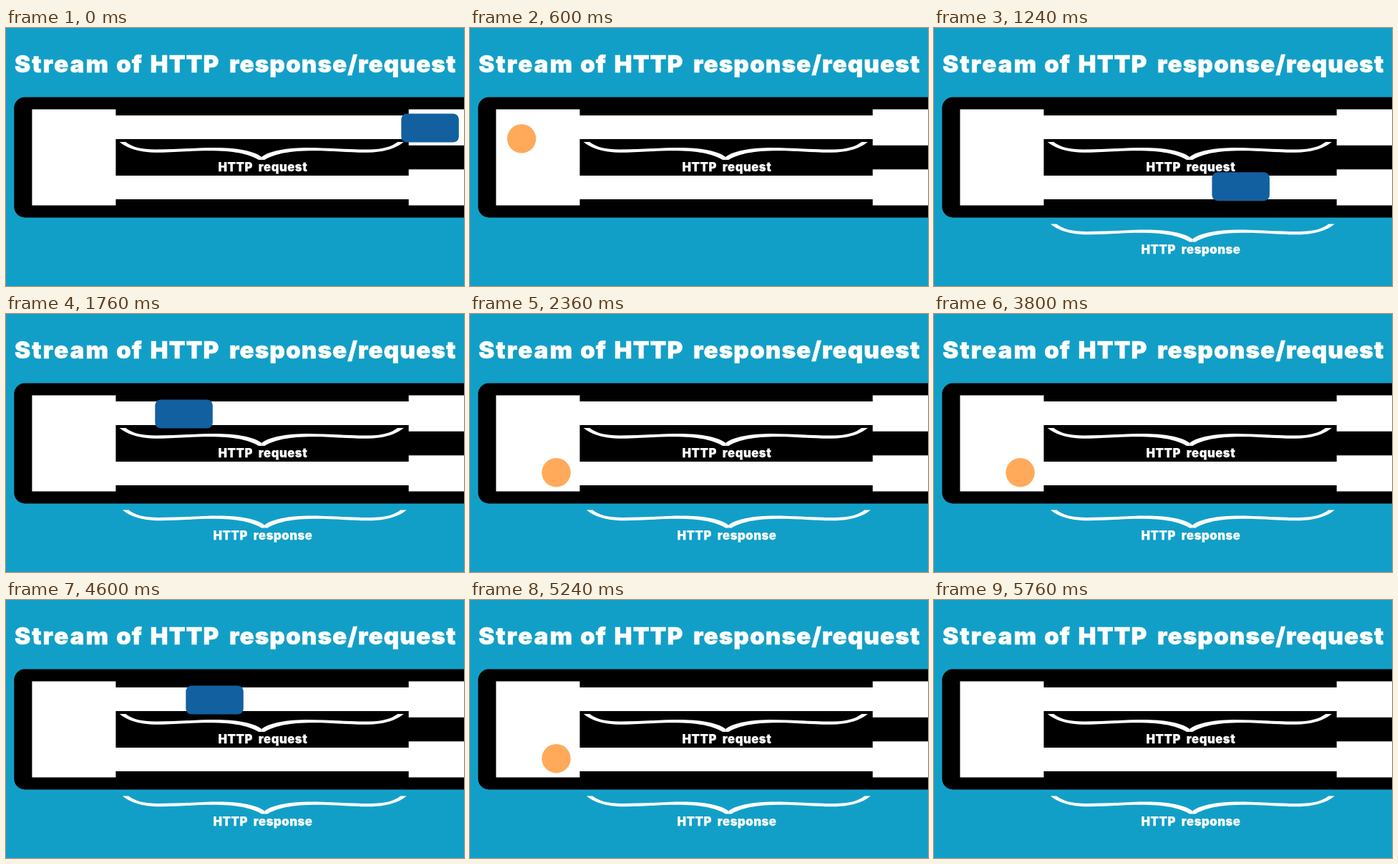
An HTML page for the animation above (7680 ms loop, 640 px wide and 360 px high).

```html
<!DOCTYPE html>
<html lang="en">
<head>
<meta charset="utf-8">
<title>Stream of HTTP response/request</title>
<style>
  html, body { margin: 0; width: 100%; height: 100%; overflow: hidden; background: #129fc7; }
  svg { display: block; width: 640px; height: 360px; }
  text { font-family: Inter, "Open Sans", sans-serif; font-weight: 900; fill: #fff; letter-spacing: .03em; }
  .title { font-size: 33.4px; stroke: #fff; stroke-width: .5px; }
  .label { font-size: 16.7px; stroke: #fff; stroke-width: .25px; }
  .wide { letter-spacing: .06em; }
</style>
</head>
<body>
<svg viewBox="0 0 640 360">
  <defs>
    <path id="half" d="M-198.5 0H-190C-181 7 -168 10.5 -148 10.5C-115 10.5 -90 7.8 -60 8C-30 8.5 -8 14 0 21V25H-4C-14 19 -30 13.5 -60 12.5C-95 11.5 -115 14.8 -145 14.8C-175 14.8 -190 7 -198.5 0Z"/>
    <g id="brace" fill="#fff">
      <use href="#half"/>
      <use href="#half" transform="scale(-1 1)"/>
    </g>
  </defs>

  <text class="title" y="62"><tspan class="wide" x="12">Stream</tspan> <tspan x="154">of</tspan> <tspan x="201.6">HTTP</tspan> <tspan x="312">response/request</tspan></text>

  <rect x="11.3" y="96.6" width="660" height="167.8" rx="15"/>
  <g fill="#fff">
    <rect x="36.4" y="113.5" width="117" height="134"/>
    <rect x="152" y="122" width="411" height="33"/>
    <rect x="152" y="206" width="411" height="33"/>
    <rect x="562.7" y="113.5" width="80" height="50.3"/>
    <rect x="562.7" y="197.3" width="80" height="50.2"/>
  </g>

  <use href="#brace" x="357.2" y="159"/>
  <text class="label" y="200"><tspan x="296.6">HTTP</tspan> <tspan x="352.8">request</tspan></text>

  <g id="response">
    <use href="#brace" x="361.3" y="273.5"/>
    <text class="label" y="314.7"><tspan x="289.6">HTTP</tspan> <tspan x="345.8">response</tspan></text>
  </g>

  <rect id="packet" width="80.5" height="40" rx="8" fill="#1260a0"/>
  <circle id="work" r="20.2" fill="#ffaa5a"/>
</svg>
<script>
  const LOOP = 7680, STEP = 40, CYCLE = 36, STAGE = 12, CYCLES = 4;
  const REQUEST_Y = 139.5, RESPONSE_Y = 221.2, TURN_X = 120.5;
  const [response, packet, work] =
    ["response", "packet", "work"].map(id => document.getElementById(id));

  const show = (el, on) => el.setAttribute("visibility", on ? "visible" : "hidden");
  const set = (el, attrs) => {
    for (const name in attrs) el.setAttribute(name, attrs[name]);
  };
  const mix = (a, b, u) => a + (b - a) * u;

  function draw(time) {
    const tick = Math.floor((time % LOOP) / STEP);
    const active = tick < CYCLE * CYCLES;
    const stage = Math.floor((tick % CYCLE) / STAGE);
    const u = (tick % STAGE) / (STAGE - 1);

    show(response, tick >= 2 * STAGE);
    show(packet, active && stage !== 1);
    show(work, active && stage === 1);

    if (stage === 0) set(packet, { x: mix(552.3, 79.3, u), y: REQUEST_Y - 20 });
    if (stage === 2) set(packet, { x: mix(80.2, 564.6, u), y: RESPONSE_Y - 20 });
    // U-turn: a cubic curve with both handles pointing left
    if (stage === 1) set(work, {
      cx: TURN_X - 4 * 61 * u * (1 - u),
      cy: mix(REQUEST_Y, RESPONSE_Y, u * u * (3 - 2 * u))
    });
  }

  let start;
  function frame(now) {
    start ??= now;
    draw(now - start);
    requestAnimationFrame(frame);
  }
  draw(0);
  requestAnimationFrame(frame);
</script>
</body>
</html>
```
